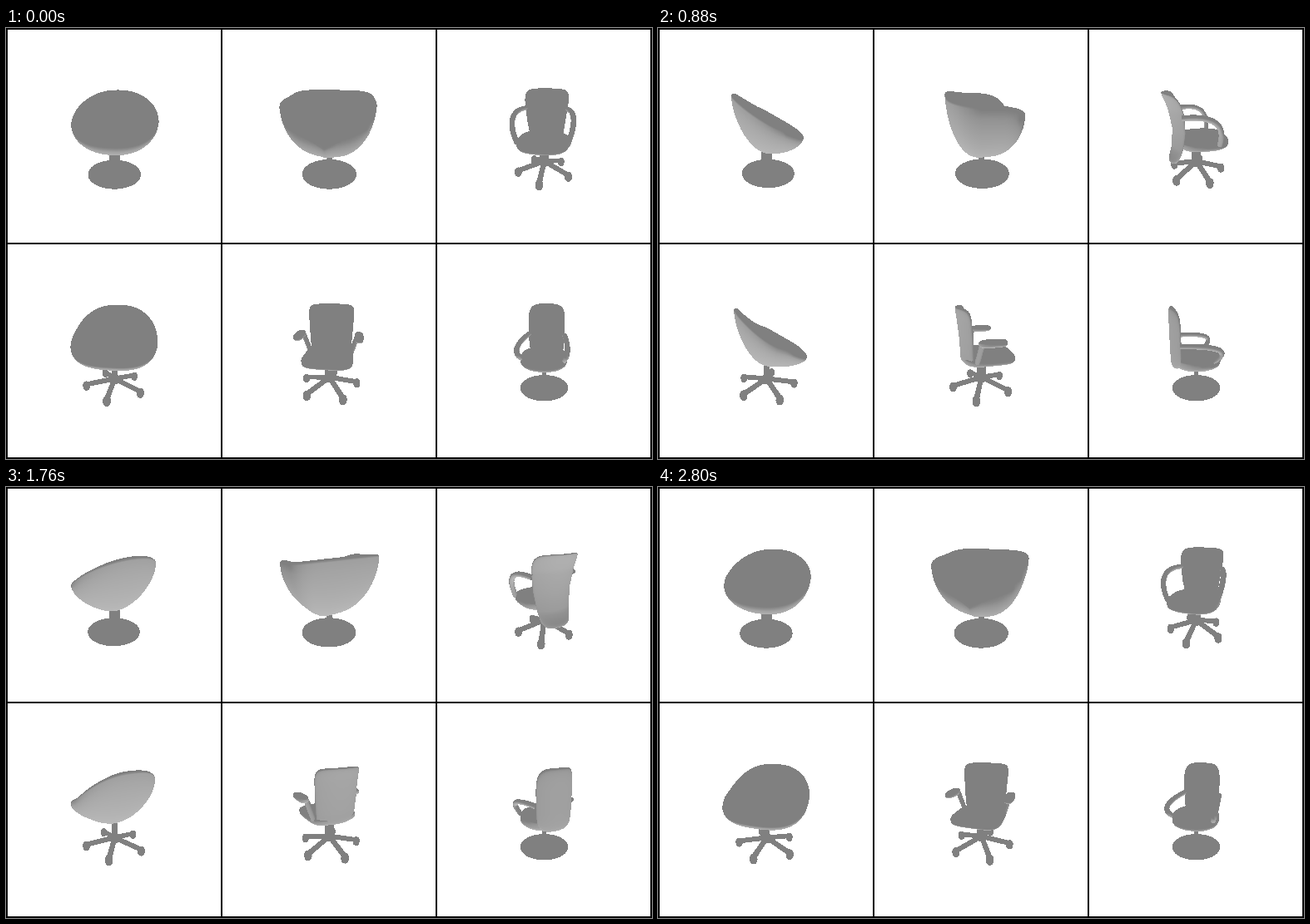
These frames come from a looping animation (776 px wide and 518 px high, 2.88 s). An HTML page with a canvas:

```html
<!DOCTYPE html>
<html lang="en">
<head>
<meta charset="utf-8">
<title>Turning chairs</title>
<style>
html, body { margin: 0; width: 100%; height: 100%; overflow: hidden; background: #fff; }
canvas { display: block; }
</style>
</head>
<body>
<canvas id="stage" width="776" height="518"></canvas>
<script>
const W = 776, H = 518, CELL = 258, LINE = 2;
const STEP = 80, STEPS = 36, START = -8;
const FOCUS = 222, TILT = 20 * Math.PI / 180;
const AMBIENT = 128, DIFFUSE = 60, LIGHT = [0, -0.95, -0.3];
const FLOOR = -48;
const { PI, sin, cos, abs, sign, min, max, floor, ceil, hypot } = Math;

const ctx = document.getElementById('stage').getContext('2d');
const image = ctx.createImageData(W, H);
const pixels = new Uint32Array(image.data.buffer);
const near = new Float32Array(W * H);
const grey = v => (0xff000000 | (v * 0x10101)) >>> 0;

const backdrop = new Uint32Array(W * H).fill(grey(255));
for (let y = 0; y < H; y++)
  for (let x = 0; x < W; x++)
    if (x % CELL < LINE || y % CELL < LINE) backdrop[y * W + x] = grey(0);

// ---- geometry ----
const cross = (a, b) => [
  a[1] * b[2] - a[2] * b[1], a[2] * b[0] - a[0] * b[2], a[0] * b[1] - a[1] * b[0]];
const sub = (a, b) => a.map((v, i) => v - b[i]);
const unit = a => { const l = hypot(...a) || 1; return a.map(v => v / l); };
const power = (v, e) => sign(v) * abs(v) ** e;
const list = (n, f) => Array.from({ length: n }, (_, i) => f(i));

// Rows run bottom to top, columns wrap round.
function mesh(rows, lit) {
  const m = rows.length, n = rows[0].length;
  const shade = rows.flatMap((row, i) => row.map((_, j) => {
    if (!lit) return AMBIENT;
    const across = sub(row[(j + 1) % n], row[(j + n - 1) % n]);
    const up = sub(rows[min(m - 1, i + 1)][j], rows[max(0, i - 1)][j]);
    const nrm = unit(cross(across, up));
    return AMBIENT + DIFFUSE * max(0, nrm[1] * LIGHT[1] + nrm[2] * LIGHT[2]) ** 0.5;
  }));
  return { m, n, pts: rows.flat(), shade };
}

// Superellipsoid; e squares it seen from above, f from the side.
function solid({ x = 0, z = 0, lo, hi, w, d = w, e = 1, f = 1, taper = 0, bend = 0, rake = 0, waist = 0, lit = true }) {
  const m = 30, n = 48;
  return mesh(list(m + 1, i => {
    const b = (i / m - 0.5) * PI, t = power(sin(b), f), y = (lo + hi + t * (hi - lo)) / 2;
    const s = max(0.02, abs(cos(b)) ** f), wide = w * s * (1 - taper * (1 - t) / 2);
    const mid = z - rake * ((y - waist) / 44) ** 2;
    return list(n, j => {
      const a = j / n * 2 * PI, dx = wide * power(sin(a), e);
      return [x + dx, y, mid + d * s * power(cos(a), e) + bend * (dx / 25) ** 2];
    });
  }), lit);
}

// Rod along a quadratic curve
function rod(p, q, r, ref, lit, c = p.map((v, i) => (v + q[i]) / 2)) {
  const m = 12, n = 10;
  return mesh(list(m + 1, i => {
    const t = i / m, o = p.map((v, k) => (1 - t) ** 2 * v + 2 * t * (1 - t) * c[k] + t * t * q[k]);
    const d = unit(p.map((v, k) => (1 - t) * (c[k] - v) + t * (q[k] - c[k])));
    const a = unit(cross(d, ref)), b = cross(d, a);
    return list(n, j => {
      const u = r * cos(j / n * 2 * PI), v = r * sin(j / n * 2 * PI);
      return o.map((s, k) => s + a[k] * u + b[k] * v);
    });
  }), lit);
}

// Bowl under a rim that rises from front to back, with a rolled lip.
function shell({ w, d, z, e, front, back, rise, base, lip = 3, curve }) {
  const n = 84, bowl = 16, roll = 5;
  const rim = list(n, j => {
    const a = j / n * 2 * PI, b = (1 - cos(a)) / 2;
    return [w * power(sin(a), e), front + (back - front) * b ** rise - lip, z + d * power(cos(a), e)];
  });
  return mesh(list(bowl + roll + 1, i => {
    const u = min(1, i / bowl) ** 2, a = max(0, i - bowl) / roll * PI;
    const out = max(0.02, (1 - (1 - u) ** curve) ** (1 / curve));
    return rim.map(([x, y, q]) => {
      const s = out - lip * (1 - cos(a)) / hypot(x, q);
      return [x * s, base + (y - base) * u + lip * sin(a), q * s];
    });
  }), true);
}

const column = (w, lo, hi) => solid({ lo, hi, w, f: 0.1, lit: false });
const disc = (w, z = 0) => solid({ lo: FLOOR - 2, hi: FLOOR + 1, w, z, f: 0.3, lit: false });

function star(r, turn, hub) {
  const wheel = FLOOR + 2;
  return [solid({ lo: hub - 6, hi: hub + 4, w: 6, f: 0.5, lit: false }), ...list(5, k => {
    const a = (turn + 72 * k) * PI / 180, x = r * sin(a), z = r * cos(a);
    return [
      rod([0, hub, 0], [x, wheel + 2, z], 3.2, [0, 1, 0], false),
      solid({ x, z, lo: wheel - 6, hi: wheel + 6, w: 4.4, f: 0.8, lit: false })
    ];
  }).flat()];
}

const both = make => [1, -1].flatMap(make);
const arms = (p, c, q, r) => both(s => {
  const side = ([x, y, z]) => [s * x, y, z];
  return rod(side(p), side(q), r, [1, 0, 0], true, side(c));
});

// ---- the six chairs ----
const chairs = [
  [
    shell({ w: 50, d: 40, z: 1, e: 0.92, front: 6, back: 51, rise: 1.2, base: -19, curve: 1.7 }),
    column(6.5, FLOOR, -16), disc(33.5, 2)
  ],
  [
    shell({ w: 51, d: 40, z: 0, e: 0.5, front: 10, back: 51, rise: 0.2, base: -23, curve: 2 }),
    column(4, FLOOR, -20), disc(34.5, 1)
  ],
  [
    solid({ lo: -27, hi: 53, w: 29, d: 3, z: -25, e: 0.7, f: 0.3, taper: 0.35, bend: 9, rake: 11, waist: 8 }),
    solid({ lo: -10, hi: 3, w: 30, d: 30, z: 7, e: 0.75, f: 0.5 }),
    ...arms([26, 30, -20], [40, 36, 26], [28, -2, 20], 3),
    column(6, -38, -6), ...star(33, -2, -33)
  ],
  [
    shell({ w: 49, d: 40, z: 4, e: 0.8, front: 2, back: 51, rise: 1.4, base: -16, curve: 1.7 }),
    column(4, -42, -12), ...star(36, -6, -37)
  ],
  [
    solid({ lo: -8, hi: 53, w: 28, d: 3.5, z: -22, e: 0.7, f: 0.25, taper: 0.1, bend: 7, rake: 3 }),
    solid({ lo: -10, hi: 1, w: 29, d: 30, z: 7, e: 0.5, f: 0.5 }),
    ...both(s => [
      solid({ x: 34 * s, z: 5, lo: 16, hi: 24, w: 5, d: 15, e: 0.7, f: 0.6 }),
      rod([26 * s, -4, -10], [32 * s, 18, -6], 3, [1, 0, 0], true)
    ]),
    column(6, -40, -6), ...star(36, 33, -35)
  ],
  [
    solid({ lo: -15, hi: 53, w: 23, d: 3, z: -28, e: 0.8, f: 0.45, bend: 8 }),
    solid({ lo: -18, hi: 1, w: 28, z: 1, e: 0.9, f: 0.6 }),
    ...arms([23, 15, -22], [32, 14, 42], [24, -5, 14], 3),
    column(3, FLOOR, -14), disc(30.5)
  ]
];

// ---- rendering ----
function triangle(a, b, c) {
  const area = (b[0] - a[0]) * (c[1] - a[1]) - (b[1] - a[1]) * (c[0] - a[0]);
  if (abs(area) < 1e-6) return;
  const x0 = ceil(min(a[0], b[0], c[0])), x1 = floor(max(a[0], b[0], c[0]));
  const y0 = ceil(min(a[1], b[1], c[1])), y1 = floor(max(a[1], b[1], c[1]));
  for (let y = y0; y <= y1; y++) {
    for (let x = x0; x <= x1; x++) {
      const u = ((x - a[0]) * (c[1] - a[1]) - (y - a[1]) * (c[0] - a[0])) / area;
      const v = ((b[0] - a[0]) * (y - a[1]) - (b[1] - a[1]) * (x - a[0])) / area;
      if (u < -1e-6 || v < -1e-6 || u + v > 1.000001) continue;
      const mix = i => a[i] + u * (b[i] - a[i]) + v * (c[i] - a[i]);
      const k = mix(2), p = y * W + x;
      if (k <= near[p]) continue;
      near[p] = k;
      pixels[p] = grey(area > 0 ? AMBIENT : floor(mix(3)));
    }
  }
}

function drawMesh({ m, n, pts, shade }, cx, cy, angle) {
  const ca = cos(angle), sa = sin(angle), ct = cos(TILT), st = sin(TILT);
  const v = pts.map(([x, y, z], i) => {
    const fx = x * ca + z * sa, fz = z * ca - x * sa;
    const k = FOCUS / (FOCUS - fz * ct - y * st);
    return [cx + fx * k, cy - (y * ct - fz * st) * k, k, shade[i]];
  });
  for (let i = 0; i < m - 1; i++) {
    for (let j = 0; j < n; j++) {
      const p = i * n + j, q = i * n + (j + 1) % n;
      triangle(v[p], v[q], v[p + n]);
      triangle(v[q], v[q + n], v[p + n]);
    }
  }
}

function draw(step) {
  pixels.set(backdrop);
  near.fill(0);
  const angle = (START + step * 360 / STEPS) * PI / 180;
  chairs.forEach((parts, i) => {
    const cx = 130 + i % 3 * CELL, cy = 130 + floor(i / 3) * CELL;
    for (const part of parts) drawMesh(part, cx, cy, angle);
  });
  ctx.putImageData(image, 0, 0);
}

let shown = -1;
function tick(now) {
  const step = floor(now / STEP) % STEPS;
  if (step !== shown) draw(shown = step);
  requestAnimationFrame(tick);
}
draw(0);
requestAnimationFrame(tick);
</script>
</body>
</html>
```
